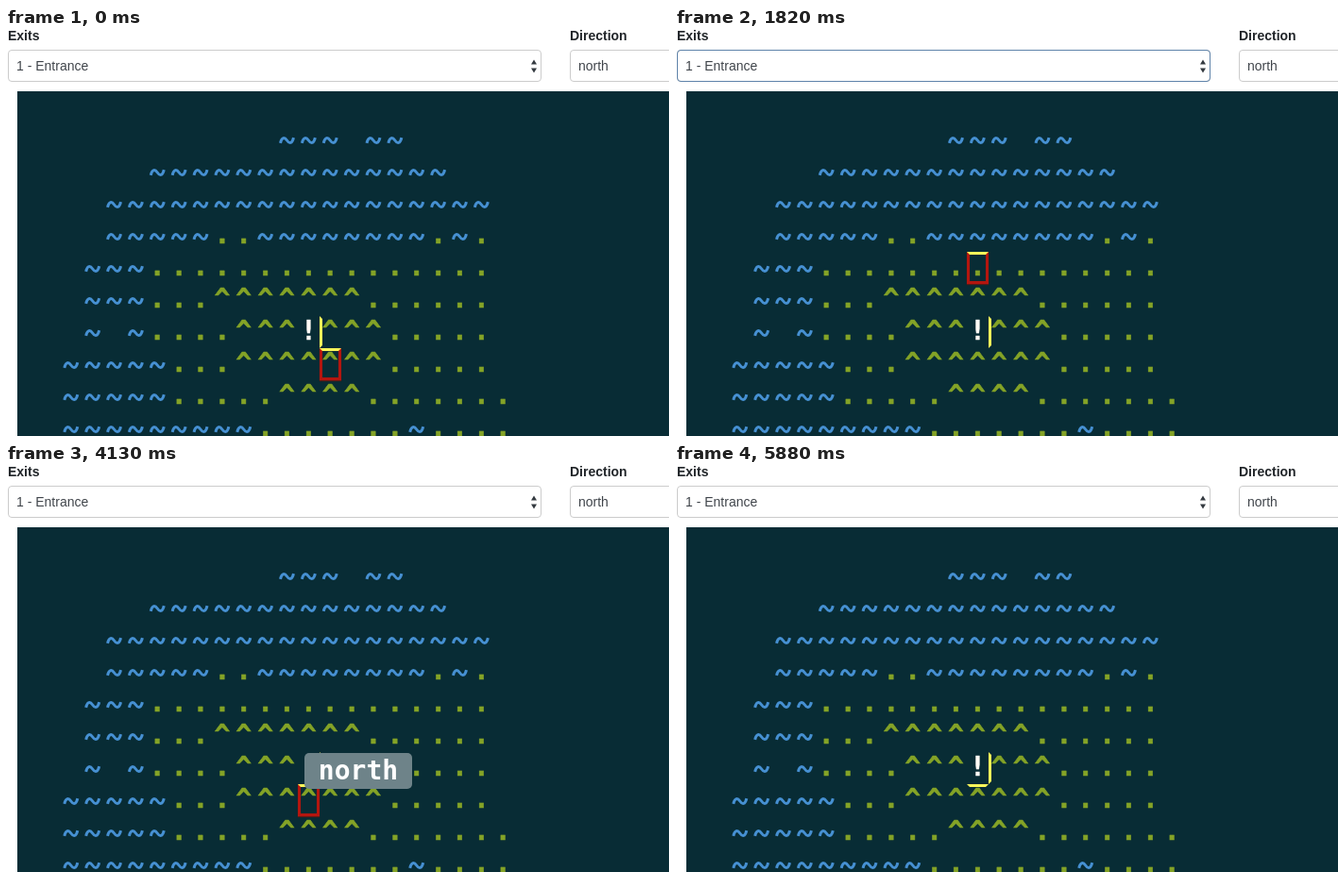
Write an HTML page that moves like this. It is 702 by 432 pixels and loops after 5.95 s.

```html
<!DOCTYPE html>
<html lang="en">
<head>
<meta charset="utf-8">
<title>Map exits</title>
<style>
  html, body { margin: 0; width: 100%; height: 100%; overflow: hidden; background: #fff; }
  body { position: relative; font: 14px "Liberation Sans", Arial, sans-serif; color: #40454b; }
  body * { position: absolute; box-sizing: border-box; }
  label { top: 0; line-height: 16px; font-weight: bold; color: #212529; }
  .field { top: 23px; height: 34px; line-height: 33px; padding-left: 8px; border: 1px solid #ccc; border-radius: 4px; }
  .exits { left: 2px; width: 565px; }
  .direction { left: 597px; width: 140px; }
  #focus { border-color: #5f83aa; }
  #map { left: 12px; top: 67px; right: 0; bottom: 0; background: #082c35; }
  svg { left: 0; top: 0; }
  .glyph { font: bold 28px "DejaVu Sans Mono", monospace; text-anchor: middle; stroke-width: .5; }
  .wave { fill: none; stroke-width: 3; }
  .cell { width: 23px; height: 34px; border: 3px solid transparent; }
  .west { border-left-color: #faf65a; }
  .north { border-top-color: #faf65a; }
  #hover { border-color: #faf65a #b3160f #b3160f; box-shadow: 0 1px 1px #5a1a16, inset 0 0 1px #5a1a16; }
  #tip { left: 316px; top: 306px; width: 114px; height: 38px; border-radius: 5px; background: #6e8389; color: #fff;
    font: bold 28px/37px "DejaVu Sans Mono", monospace; text-align: center; }
</style>
</head>
<body>
<label style="left:2px">Exits</label>
<label style="left:597px">Direction</label>
<div class="field exits">1 - Entrance</div>
<div class="field direction">north</div>
<div id="focus" class="field exits"></div>
<div id="map"></div>
<svg id="art" width="702" height="432">
  <path d="M556 38.5l3-5 3 5zm0 4l3 5 3-5z" fill="#343a40"/>
</svg>
<div id="west" class="cell west"></div>
<div id="north" class="cell north"></div>
<div id="hover" class="cell"></div>
<div id="tip">north</div>
<script>
const LOOP = 5950, STEP = 70, COL = 22.87, ROW = 34;
const $ = id => document.getElementById(id);

const rows = [
  "          ~~~ ~~",
  "    ~~~~~~~~~~~~~~",
  "  ~~~~~~~~~~~~~~~~~~",
  "  ~~~~~..~~~~~~~~.~.",
  " ~~~................",
  " ~~~...^^^^^^^......",
  " ~ ~....^^^!^^^.....",
  "~~~~~...^^^^^^^.....",
  "~~~~~.....^^^^.......",
  "~~~~~~~~~.......~...."
];
const colors = { "~": "#4690d2", ".": "#84a327", "^": "#84a327", "!": "#fffaf5" };

function add(tag, attrs) {
  const el = document.createElementNS("http://www.w3.org/2000/svg", tag);
  for (const name in attrs) el.setAttribute(name, attrs[name]);
  return $("art").appendChild(el);
}

rows.forEach((row, r) => [...row].forEach((ch, c) => {
  if (ch === " ") return;
  const x = 68.8 + c * COL, y = 119 + r * ROW, color = colors[ch];
  if (ch === "~")
    add("path", { class: "wave", stroke: color, d: `M${x - 7} ${y + 2.8}c1.500 -6.500 4.500 -6.500 7 -2.800s5.500 3.700 7 -2.800` });
  else
    add("text", { class: "glyph", fill: color, stroke: color, x, y: y + 7.4 }).textContent = ch;
}));

function place(el, col, row) {
  el.style.left = Math.round(57.3 + col * COL) + "px";
  el.style.top = 101 + row * ROW + "px";
}
place($("west"), 12, 6);
place($("north"), 11, 7);

const show = (el, on) => { el.style.visibility = on ? "visible" : "hidden"; };
const ramp = (t, from, to) => Math.min(1, Math.max(0, (t - from) / (to - from)));
const glide = (a, b, p) => Math.round(a + (b - a) * p);

// cell under the pointer, or null while it is off the map
function pointer(t) {
  if (t < 280) return [glide(12, 13, t / 280), glide(7, 0, t / 280)];
  if (t < 1400) return null;
  if (t < 3150) {
    const p = ramp(t, 1400, 2170);
    return [glide(10, 11, p), glide(0, 7, p)];
  }
  if (t < 5180) {
    const a = Math.PI * ramp(t, 3150, 3990);
    return [11 + Math.round(1.4 * Math.sin(a)), 7 + Math.round(Math.max(0, Math.sin(2 * a)))];
  }
  return t < 5530 ? [11, glide(8, 10, ramp(t, 5180, 5530))] : null;
}

function draw(t) {
  const cell = pointer(t);
  show($("hover"), cell);
  if (cell) place($("hover"), ...cell);
  show($("north"), t >= 2940);
  show($("tip"), t >= 3990 && t < 5180);
  $("focus").style.opacity = ramp(t, 1050, 1190) - ramp(t, 2940, 3010);
}

const start = performance.now();
function tick() {
  const t = (performance.now() - start) % LOOP;
  draw(t - t % STEP);
  requestAnimationFrame(tick);
}
tick();
</script>
</body>
</html>
```
